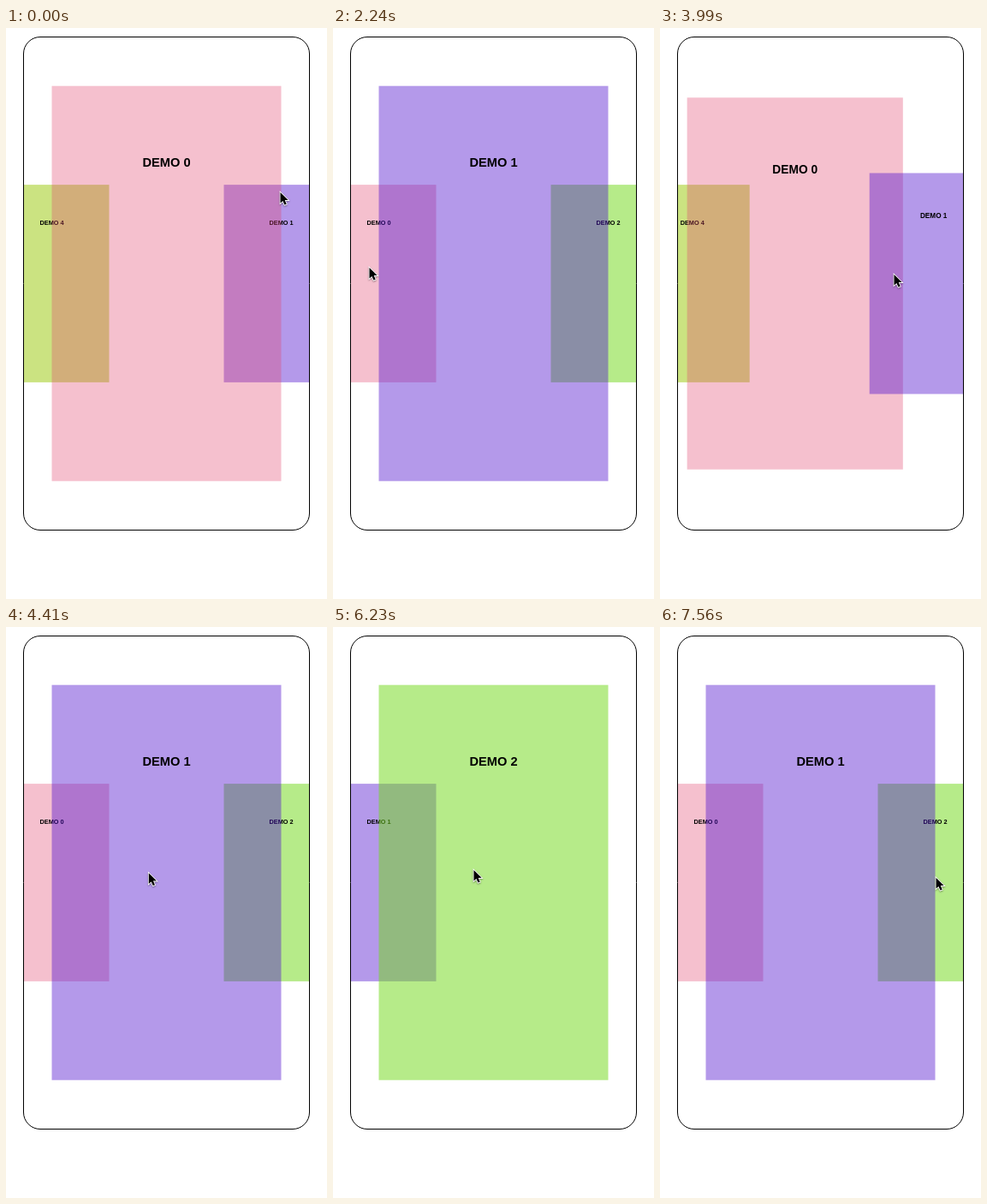
Recreate the animation shown at these times as an HTML page with a canvas. Size 375 by 667 pixels, loop 8680 ms.

```html
<!DOCTYPE html>
<html>
<head>
<meta charset="utf-8">
<style>
  html, body { margin: 0; width: 100%; height: 100%; overflow: hidden; background: #fff; }
  canvas { display: block; width: 375px; height: 667px; }
</style>
</head>
<body>
<canvas id="stage"></canvas>
<script>
const LOOP = 8680, STEP = 70;
const CARD_W = 335, CARD_H = 577, SPACING = 134, DRAG_SPAN = 148.5;
const CENTER_X = 187.5, CENTER_Y = 298.5;
const COLORS = [
  'rgba(225,64,106,.33)', 'rgba(78,12,206,.42)', 'rgba(115,216,30,.52)',
  'rgba(90,160,220,.4)', 'rgba(151,199,5,.5)'
];

const flick = u => 1 - (1 - u) ** 2;
const smooth = u => u * u * (3 - 2 * u);

// Pointer strokes; one with a drop time grabs the card until then
const HOME = { x: 319, y: 190 };
const STROKES = [
  { start: 0, end: 420, x: 323, y: 254, ease: smooth },
  { start: 560, end: 2240, x: 41, y: 278, ease: flick, drop: 1260 },
  { start: 2310, end: 2940, x: 195, y: 285, ease: smooth, drop: 3080 },
  { start: 3010, end: 3920, x: 323, y: 286, ease: smooth },
  { start: 3920, end: 4340, x: 156, y: 286, ease: flick, drop: 4340 },
  { start: 4340, end: 4830, x: 323, y: 277, ease: smooth },
  { start: 4970, end: 5880, x: 155, y: 283, ease: smooth, drop: 7560 },
  { start: 5950, end: 6230, x: 163, y: 282, ease: smooth },
  { start: 6230, end: 7560, x: 321, y: 291, ease: smooth }
];

const canvas = document.getElementById('stage');
const ctx = canvas.getContext('2d');
const ratio = window.devicePixelRatio || 1;
canvas.width = 375 * ratio;
canvas.height = 667 * ratio;

function pointerAt(t) {
  let { x, y } = HOME;
  for (const s of STROKES) {
    if (t < s.start) break;
    const k = s.ease(Math.min(1, (t - s.start) / (s.end - s.start)));
    x += (s.x - x) * k;
    y += (s.y - y) * k;
  }
  return { x, y };
}

// Progress towards the next (+) or previous (-) card, quadratic in drag distance
function dragProgress(stroke, t) {
  const d = (pointerAt(stroke.start).x - pointerAt(t).x) / DRAG_SPAN;
  return Math.sign(d) * Math.min(1, d * d);
}

function carouselAt(t) {
  let active = 0;
  for (const stroke of STROKES.filter(s => s.drop)) {
    if (t < stroke.start) break;
    const progress = dragProgress(stroke, Math.min(t, stroke.drop));
    if (t < stroke.drop) return { active, progress };
    active += Math.round(progress);
  }
  return { active, progress: 0 };
}

function drawCard(index, offset) {
  const d = Math.abs(offset), near = Math.min(d, 1);
  const scale = 0.8 - 0.4 * near;
  const shift = Math.sign(offset) * SPACING * (d + near * (1 - near));
  ctx.save();
  ctx.translate(CENTER_X + shift, CENTER_Y);
  ctx.scale(scale, scale);
  ctx.fillStyle = COLORS[index];
  ctx.fillRect(-CARD_W / 2, -CARD_H / 2, CARD_W, CARD_H);
  ctx.fillStyle = '#000';
  ctx.font = 'bold 18.3px "Liberation Sans", Arial, sans-serif';
  ctx.textAlign = 'center';
  ctx.fillText('DEMO ' + index, 0, -170.5);
  ctx.restore();
}

const arrow = new Path2D('M0 0V15.2L3.5 12L6 17.6L8.7 16.5L6.3 10.9H11Z');

function drawPointer({ x, y }) {
  ctx.save();
  ctx.translate(x + 1.5, y + 2);
  ctx.scale(0.83, 0.83);
  ctx.lineWidth = 2;
  ctx.strokeStyle = '#fff';
  ctx.shadowColor = 'rgba(0,0,0,.4)';
  ctx.shadowBlur = 2 * ratio;
  ctx.shadowOffsetY = ratio;
  ctx.stroke(arrow);
  ctx.shadowColor = 'transparent';
  ctx.fillStyle = '#000';
  ctx.fill(arrow);
  ctx.restore();
}

function draw(t) {
  const { active, progress } = carouselAt(t);
  const top = Math.sign(progress);
  const order = top ? [-top, 0, top] : [-1, 1, 0];

  ctx.setTransform(ratio, 0, 0, ratio, 0, 0);
  ctx.fillStyle = '#fff';
  ctx.fillRect(0, 0, 375, 667);

  const frame = new Path2D();
  frame.roundRect(20.5, 10.5, 334, 576, 19.5);
  ctx.save();
  ctx.clip(frame);
  for (const side of order) drawCard((active + side + 5) % 5, side - progress);
  ctx.restore();

  ctx.strokeStyle = '#000';
  ctx.lineWidth = 1;
  ctx.stroke(frame);
  drawPointer(pointerAt(t));
}

function tick() {
  const t = performance.now() % LOOP;
  draw(Math.floor(t / STEP) * STEP);
  requestAnimationFrame(tick);
}
tick();
</script>
</body>
</html>
```
